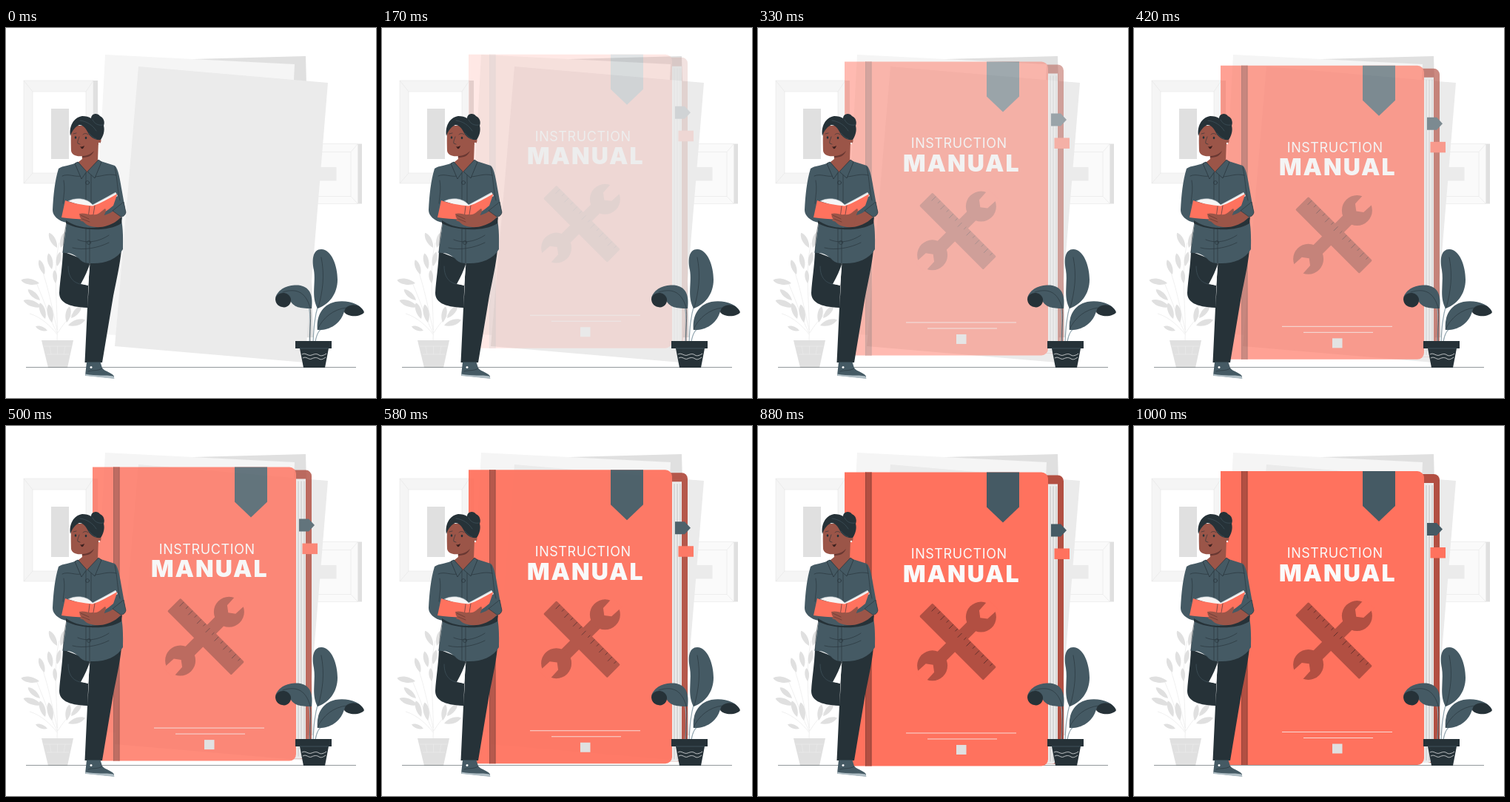
Write an HTML page that moves like this. It is 500 by 500 pixels and loops after 1.04 s.

```html
<!DOCTYPE html>
<html lang="en">
<head>
<meta charset="utf-8">
<title>Instruction manual</title>
<style>
  html, body { margin: 0; width: 100%; height: 100%; overflow: hidden; background: #fff; }
  svg { display: block; width: 100%; height: 100%; }
  text { font-family: Inter, Roboto, sans-serif; fill: #fafafa; text-anchor: middle; }
  .line { fill: none; stroke: #263238; stroke-width: .6; stroke-linecap: round; stroke-linejoin: round; }
  .pale { fill: none; stroke: #e0e0e0; stroke-width: .5; }
  .skin { fill: #9b5548; }
</style>
</head>
<body>
<svg viewBox="0 0 500 500">
  <!-- wall frames -->
  <path d="M118 71h6v139h-6z" fill="#e0e0e0"/>
  <path d="M24 71h94v139H24z" fill="#f5f5f5"/>
  <path d="M36 86h72v110H36z" fill="#fff"/>
  <path class="pale" d="M24 71h94v139H24zM36 86h72v110H36zM24 71l12 15M118 71l-10 15M24 210l12-14"/>
  <path d="M61 109h24v68H61z" fill="#e0e0e0"/>
  <path d="M475.5 156.500h5.500v81h-5.500z" fill="#e0e0e0"/>
  <path d="M390 156.500h85.500v81H390z" fill="#fafafa"/>
  <path class="pale" d="M390 156.500h85.500v81H390zM400 167.500h66v60h-66zM466 167.500l9.500-11M466 227.500l9.500 10"/>
  <path d="M420 188h26.500v18.500H420z" fill="#ebebeb"/>

  <!-- potted shrub -->
  <g id="shrub" fill="#e0e0e0">
    <path class="pale" d="M69 422C71 380 62 330 72 290M69 408C65 390 57 350 49 328M69 412C60 395 54 375 40 342M69 414C60 402 46 390 32 386M70 412C76 402 82 395 95 381"/>
    <path d="M48 422h43l-8 37H57z"/>
    <path d="M51 430h37M55 441h30M59 430l2 11M69.500 430v11M80 430l-2 11" fill="none" stroke="#ebebeb" stroke-width=".6"/>
  </g>

  <path d="M27 458.500h446" stroke="#263238" stroke-width=".5"/>

  <!-- loose sheets -->
  <path d="M235 42.500l170-4.500 10 380-170 4z" fill="#e0e0e0"/>
  <path d="M134 36l256 13-19 378-257-14z" fill="#f5f5f5"/>
  <path d="M179 52l256 22-31 378-257-22z" fill="#ebebeb"/>

  <g id="book" opacity="0">
    <path d="M380 65h25a8 8 0 0 1 8 8v374a8 8 0 0 1-8 8h-25z" fill="#b24f42"/>
    <path d="M385 77h20v370a8 8 0 0 1-8 8h-12z" fill="#ebebeb"/>
    <path d="M395 80v372M399 80v372M403 80v367" stroke="#a6a6a6" stroke-width=".6"/>
    <path d="M396 131h13l8 8.500-8 8.500h-13z" fill="#455a64"/>
    <path d="M400.500 164H421v14.500h-20.500z" fill="#ff725e"/>
    <path d="M117 61h266a9 9 0 0 1 9 9v379a9 9 0 0 1-9 9H117z" fill="#ff725e"/>
    <path d="M145 61h8.500v397H145z" fill="#b24f42"/>
    <path d="M145.500 61v397M153 61v397" stroke="#8f3f35" stroke-width=".7"/>
    <path d="M309 61h44v47l-22 21-22-21z" fill="#455a64"/>
    <text x="271.700" y="178" font-size="18" letter-spacing=".6" font-weight="400">INSTRUCTION</text>
    <text x="275.300" y="209.500" font-size="32" letter-spacing="2" font-weight="900">MANUAL</text>
    <g transform="translate(268.500 289.500) rotate(45)" fill="#b24f42">
      <path d="M-8.500-34h17v68h-17z"/>
      <g id="jaw">
        <circle cy="-46.500" r="20.500"/>
        <path d="M-9-70l1 19 8 6 8-6 1-19z" fill="#ff725e"/>
      </g>
      <use href="#jaw" transform="rotate(180)"/>
    </g>
    <g transform="translate(270 290) rotate(45)">
      <rect x="-61" y="-12.500" width="122" height="25" rx="1.500" fill="#b24f42"/>
      <path id="ticks" stroke="#542a28" stroke-width=".8"/>
    </g>
    <path d="M200 413.500h149M229 421.500h94" stroke="#f5f5f5" stroke-width=".8"/>
    <path d="M268 429.500h13.500v13H268z" fill="#e0e0e0"/>
  </g>

  <!-- leafy plant -->
  <g fill="#455a64">
    <path d="M410 424C411 405 412 390 409 374M415 424C416 405 417 390 422 374M418 424C420 412 423 408 432 402" fill="none" stroke="#90a4ae" stroke-width="1.200"/>
    <path d="M421 379C412 362 419 345 416 327C413 312 415 299 426 299C440 299 448 322 448 340C448 360 436 374 421 379z"/>
    <path d="M413 379C396 379 390 377 385 370C382 360 372 355 364 365C368 350 386 346 398 348C411 351 415 361 413 379z"/>
    <path d="M364 366C366 356 382 355 385 366C386 374 379 379 373 377C367 376 364 371 364 366z" fill="#263238"/>
    <path d="M421 408C419 390 427 374 445 370C462 367 480 373 484 384C477 372 460 374 456 386C451 400 437 409 421 408z"/>
    <path d="M457 384C458 372 478 370 484 384C481 390 463 392 457 384z" fill="#263238"/>
    <path class="line" d="M426 310C431 335 428 355 422 378M374 357C395 350 406 360 411 378C413 390 410 405 411 423M460 378C442 380 428 392 421 407"/>
    <path d="M391 423h49v10h-4l-5 26h-29l-5-26h-6z" fill="#263238"/>
    <path d="M397 433h39" stroke="#455a64" stroke-width=".8"/>
    <path d="M400 441c5-3 8 3 13 1s7-2 10 0 7 0 10-2M401 446c5-3 8 3 12 1s7-2 10 0 6 0 9-2" fill="none" stroke="#fff" stroke-width=".7"/>
  </g>

  <!-- reader -->
  <g>
    <path d="M77 302C76 325 73 340 72 358C72 370 83 377 110 378L112 348L101 346C106 337 111 327 114 316L156 300C154 320 149 342 145 362L130 452H106.500L110 378L113 316z" fill="#263238"/>
    <path d="M113.500 318C112 329 108 338 103.500 346L111 348z" fill="#fff"/>
    <path class="line" d="M84 322C84 340 94 345 101 346" style="stroke:#455a64"/>
    <path d="M109 451.500h18.500l2.500 8c4 5 13 6 16 11v3l-39-4z" fill="#455a64"/>
    <path d="M107 467.500c16 3 27 1 38.500 3l1 3.500-39-4z" fill="#b0bec5"/>
    <path class="line" d="M111 464c5-2 13 0 19-4"/>
    <circle cx="115" cy="458.500" r="1.500" fill="#fff"/>

    <path d="M97 181L125 179L147 186C152 190 154 205 157 222L162 250L155 256C159 270 158 290 158 299C150 313 132 319 115 318C108 318 105 317 101 314C95 308 88 303 76.500 304L82 263C71 261 63 254 63 246C64 226 66 206 71 190C76 186 88 186 97 181z" fill="#455a64"/>
    <path class="line" d="M108 194V236M115 194V236M108 270V317M113 270V318M76 200c8-4 18 2 25 0M119 201c10 0 18-5 30-2M147 188c4 18 3 30 7 45M78 206c2 12 0 20-1 31M82 263C78 280 78 292 77 303M97 286c14 6 30 2 42-6M90 297c15 4 35 0 49-7"/>
    <circle class="line" cx="110" cy="209" r="2.500"/><circle class="line" cx="112" cy="290" r="2.500"/>

    <path class="skin" d="M102 168L125 152L124 180C119 187 113 193 109 195L98 181L103 177z"/>
    <path d="M103 173c7 0 12-3 16-7-3 7-8 9-16 9z" fill="#693832"/>
    <path d="M97 181l12 13-7 10-9-21zM125 178l-15 16 10 9 9-22z" fill="#455a64" stroke="#263238" stroke-width=".7"/>

    <path class="skin" d="M89 132C87 148 88 158 88 166C89 172 96 174 103 173C113 171 120 165 122 158C128 158 131 151 126 148L118 132z"/>
    <path d="M87 146C85 133 91 121 103 119C108 119 112 120 115 122C115 115 124 114 127 119C132 121 134 127 132 132C134 139 131 147 128 151C120 152 113 147 110 140C107 134 103 131 99 131C94 133 89 139 87 146z" fill="#263238"/>
    <path d="M112 142c3 4 7 7 10 8M117 124c3 6 8 8 14 7M100 125c9 1 17 6 22 14" class="line" style="stroke:#455a64"/>
    <path class="line" d="M99 147c-1 4-3 6-2 9l3 1M91 143l4-1M104 144c2-2 5-2 7 0"/>
    <path d="M100 160c2 1 4 0 6-1-1 3-2 5-4 4z" fill="#3d211f"/>
    <g fill="#263238"><ellipse cx="94" cy="148" rx="1.300" ry="1.800"/><ellipse cx="108" cy="148.500" rx="1.300" ry="1.800"/></g>
    <circle cx="126" cy="156" r="1.200" fill="#fff"/>

    <path d="M81 260C98 272 130 276 157 255L156 264C137 276 100 274 81 264z" fill="#263238"/>
    <path class="skin" d="M157 244C160 254 150 263 137 267C126 271 114 269 108 265L98 256C106 252 118 253 126 254C137 253 145 249 150 242z"/>
    <path d="M84 234C93 229 109 229 117 239L148 222L151 227L115 244z" fill="#f5f5f5"/>
    <path class="line" d="M84 234C93 229 109 229 117 239L148 223" style="stroke:#b0bec5"/>
    <path d="M80 233C93 238 105 239 117 240.500C128 237 138 231 150.500 224L145 240C137 247 128 252 118 258C104 259 89 258 75 256z" fill="#ff725e"/>
    <path class="line" d="M113 241l-2 16M120 240l-3 18"/>
    <path class="skin" d="M99 251C106 249 111 253 117 252C124 254 129 247 134 244C137 247 132 252 132 256L130 266C119 269 110 267 107 262L102 261C98 260 103 257 100 256z"/>
    <path class="line" d="M101 253l11 5M103 258l10 4" style="stroke:#5d302b"/>
    <path d="M144 247L159 235L162 249C161 254 158 255 155 255z" fill="#455a64" stroke="#263238" stroke-width=".6"/>
  </g>
</svg>
<script>
  const $ = id => document.getElementById(id);

  // Leaves: base x, base y, angle from upright, length
  const leaves = [
    [69, 297, -28, 23], [74, 297, 15, 22], [62, 326, -12, 22], [69, 322, 12, 20],
    [52, 333, -20, 21], [45, 345, -80, 25], [67, 345, -5, 18], [46, 368, -48, 22],
    [48, 377, -70, 26], [53, 393, -18, 23], [62, 398, -10, 25], [56, 409, -70, 17],
    [82, 398, 10, 22], [88, 392, 40, 22], [84, 402, 72, 24]
  ];
  const leaf = ([x, y, angle, l]) => {
    const w = l * .21;
    return `<path transform="translate(${x} ${y}) rotate(${angle})"
      d="M0 0C${-w} ${-l * .3} ${-w} ${-l * .8} 0 ${-l}C${w} ${-l * .8} ${w} ${-l * .3} 0 0"/>`;
  };
  $('shrub').insertAdjacentHTML('beforeend', leaves.map(leaf).join(''));

  let ticks = '';
  for (let i = 0; i < 14; i++) ticks += `M${-54 + i * 8.3}-12v${i % 2 ? 4.5 : 8}`;
  $('ticks').setAttribute('d', ticks);

  const bezier = (s, a, b) => 3 * (1 - s) ** 2 * s * a + 3 * (1 - s) * s * s * b + s ** 3;

  // cubic-bezier(.36, -.01, .5, 1.38): slides past its rest and settles
  function ease(x) {
    let lo = 0, hi = 1;
    for (let i = 0; i < 24; i++) {
      const mid = (lo + hi) / 2;
      if (bezier(mid, .36, .5) < x) lo = mid; else hi = mid;
    }
    return bezier(lo, -.01, 1.38);
  }

  const LOOP = 1040, FPS = 24, DROP = 30;

  function draw(now) {
    const step = Math.floor((now % LOOP + 5) * FPS / 1000);
    const p = step < 2 ? 0 : ease(Math.min(1, (step + 1) / FPS));
    $('book').setAttribute('opacity', Math.min(1, Math.max(0, p)));
    $('book').setAttribute('transform', `translate(0 ${DROP * (p - 1)})`);
  }

  const start = performance.now();
  function tick() {
    draw(performance.now() - start);
    requestAnimationFrame(tick);
  }
  tick();
</script>
</body>
</html>
```
